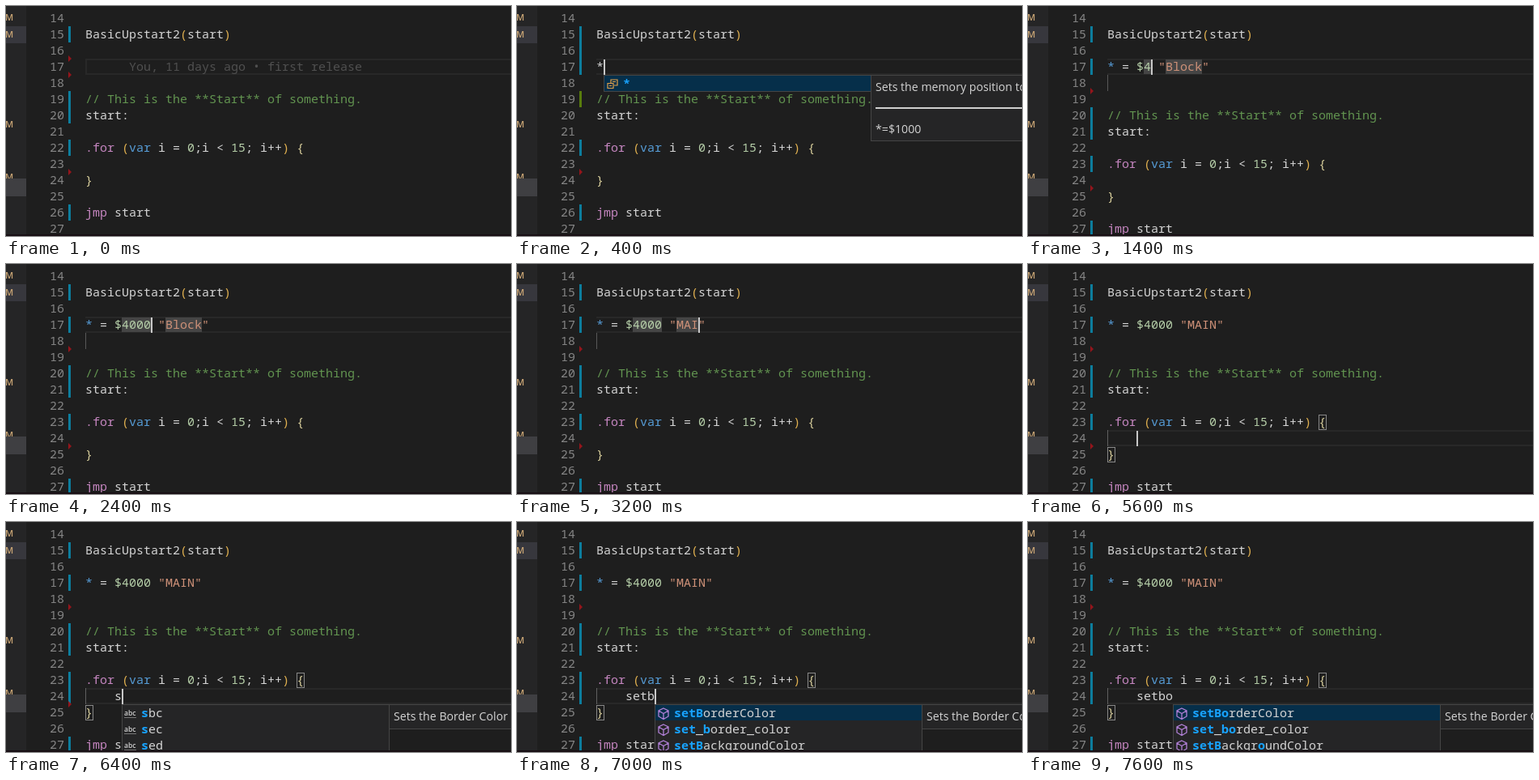
Write an HTML page that moves like this. It is 624 by 284 pixels and loops after 8 s.

```html
<!DOCTYPE html>
<html lang="en">
<head>
<meta charset="utf-8">
<title>Assembler editor</title>
<style>
html, body { margin: 0; width: 100%; height: 100%; overflow: hidden; background: #1e1e1e; }
svg { display: block; width: 624px; height: 284px; }
text { white-space: pre; font: 15px "Noto Sans Mono", monospace; }
.ui { font: 14.15px "Open Sans", sans-serif; }
.m { font: 600 11px "Open Sans", sans-serif; }
.abc { font: 600 8.5px "Open Sans", sans-serif; }
.hit { fill: #18a3ff; font-weight: 700; }
</style>
</head>
<body>
<svg id="stage" viewBox="0 0 624 284"></svg>
<script>
const LOOP = 8000, CH = 9, LH = 20, LEFT = 98, FIRST = 14;
const INK = {
  w: '#d4d4d4', p: '#c586c0', b: '#569cd6', c: '#629450', n: '#b5cea8',
  s: '#ce9178', g: '#e0b050', y: '#d9cf9c', d: '#505050'
};
const BLUE = '#0c7d9d', GREEN = '#587c0c';
const colX = c => LEFT + c * CH;
const topY = n => 5 + (n - FIRST) * LH;
const esc = s => s.replace(/&/g, '&amp;').replace(/</g, '&lt;');
const rect = (x, y, w, h, fill, extra = '') =>
  `<rect x="${x}" y="${y}" width="${w}" height="${h}" fill="${fill}" ${extra}/>`;
const frame = (x, y, w, h, line, fill = 'none') =>
  rect(x + .5, y + .5, w - 1, h - 1, fill, `stroke="${line}"`);
const text = (x, y, body, fill, extra = '') =>
  `<text x="${x}" y="${y}" fill="${fill}" ${extra}>${body}</text>`;

// Each token is an ink letter, "~" and its text; tokens are split by "|".
const paint = src => src.split('|').map(t =>
  `<tspan fill="${INK[t[0]]}">${esc(t.slice(2))}</tspan>`).join('');

function codeLines(s) {
  const org = s.num === null ? s.raw
    : `b~*|w~ = |n~$${s.num}|w~ |s~"${s.name}"`;
  return ['', 'w~BasicUpstart2|g~(|w~start|g~)', '', org, '',
    ...(s.num === null ? [] : ['']),
    'c~// This is the **Start** of something.', 'w~start:', '',
    'p~.for |g~(|b~var|w~ i = |n~0|w~;i < |n~15|w~; i++|g~)|w~ |y~{',
    s.body ? 'w~' + s.body : '', 'y~}', '', 'p~jmp|w~ start', ''].slice(0, 14);
}

function snippetMarks(s) {
  const spots = { num: [5, s.num.length], name: [7 + s.num.length, s.name.length] };
  let out = '';
  for (const key in spots) {
    const [c, len] = spots[key];
    out += rect(colX(c), 66, len * CH, 18, s.sel === key ? '#264f78' : '#454545');
  }
  return out + rect(LEFT, 85, 1, 20, '#585858');
}

function gutter(s) {
  let out = '';
  for (let i = 0; i < 14; i++)
    out += text(72, topY(FIRST + i) + 15, FIRST + i, '#858585', 'text-anchor="end"');
  for (const [a, b, fill = BLUE] of s.bars)
    out += rect(77, topY(a), 3, (b - a + 1) * LH, fill);
  for (const n of s.cuts) {
    const y = topY(n);
    out += `<path d="M77 ${y - 4}l4 4l-4 4z" fill="#94151b"/>`;
  }
  return out;
}

// Letters that match the typed prefix in order are emphasised.
function label(word, typed) {
  let k = 0;
  return [...word].map(ch => k < typed.length && ch.toLowerCase() === typed[k]
    ? (k++, `<tspan class="hit">${ch}</tspan>`) : ch).join('');
}

const icons = {
  abc: (x, y) => text(x + 3, y + 13, 'abc', '#d0d0d0', 'class="abc"') +
    rect(x + 3, y + 15, 15, 1, '#777'),
  cube: (x, y) => `<path d="M${x + 11} ${y + 4}l6 3v7l-6 3.5l-6-3.5v-7zm-6 3l6 3.5l6-3.5m-6 3.5v7"
    fill="none" stroke="#b180d7" stroke-width="1.3"/>`,
  value: (x, y) => `<path d="M${x + 9} ${y + 9}v-4h8v7h-4M${x + 11} ${y + 7.5}h4M${x + 5} ${y + 9.5}h7v6h-7zm2 3h3"
    fill="none" stroke="#e0a04a" stroke-width="1.2"/>`
};

function popup(s) {
  const { rows, icon, typed, pick, note } = s.pop;
  const x = colX(s.cur[1]), y = topY(s.cur[0] + 1);
  let out = frame(x, y, 331, rows.length * LH + (rows.length > 1 ? 8 : 1), '#454545', '#252526');
  rows.forEach((word, i) => {
    const ry = y + 1 + i * LH;
    if (pick && !i) out += rect(x + 1, ry, 329, 19, '#062f4a');
    out += icons[icon](x, ry) + text(x + 24, ry + 15, label(word, typed), '#d4d4d4');
  });
  if (note) {
    const nx = x + 330, [head, code] = note;
    out += frame(nx, y, 300, code ? 82 : 31, '#454545', '#252526') +
      text(nx + 6, y + 20, head, '#d4d4d4', 'class="ui"');
    if (code) out += rect(nx + 6, y + 40, 200, 2, '#cfcfcf') +
      text(nx + 6, y + 72, code, '#d4d4d4', 'class="ui"');
  }
  return out;
}

function sidebar() {
  let out = rect(0, 0, 25, 284, '#252526') + rect(0, 25, 25, 21, '#37373d');
  for (const y of [18, 39, 150, 215]) out += text(-1, y, 'M', '#c5a273', 'class="m"');
  return out + rect(0, 213, 25, 22, '#3f3f42');
}

function draw(s) {
  const [line, col] = s.cur, y = topY(line);
  let out = rect(0, 0, 624, 284, '#1e1e1e') + sidebar();
  out += rect(LEFT, y, 526, 2, '#282828') + rect(LEFT, y + 18, 526, 2, '#282828');
  if (s.blame) out += rect(LEFT, y, 2, 20, '#282828') +
    text(152, y + 15, 'You, 11 days ago • first release', INK.d);
  if (s.marks) out += snippetMarks(s);
  if (s.body) out += rect(LEFT, 205, 1, 20, '#606060') +
    frame(colX(29), 186, 10, 19, '#888') + frame(LEFT, 226, 10, 19, '#888');
  codeLines(s).forEach((src, i) => {
    if (src) out += text(LEFT, topY(FIRST + i) + 15, paint(src), INK.w);
  });
  out += gutter(s);
  if (s.caret) out += rect(colX(col), y + 1, 2, 19, '#c8c8c8');
  if (s.pop) out += popup(s);
  return out + rect(0, 282, 624, 2, '#180f14');
}

const BORDER = ['Sets the Border Color'];
const ops = (typed, rows, note) => ({ icon: 'abc', typed, rows, note });
const sets = typed => ({
  icon: 'cube', typed, pick: true, note: BORDER,
  rows: ['setBorderColor', 'set_border_color', 'setBackgroundColor']
});
const type = (word, pop) => ({ body: '    ' + word, cur: [24, 4 + word.length], pop });
const settled = [[15, 15], [17, 17], [20, 21], [23, 23], [27, 27]];

// Every step changes only the listed fields.
const steps = [
  [0, { raw: '', num: null, name: 'Block', body: '', cur: [17, 0], caret: false, blame: true,
    marks: false, sel: '', pop: null, cuts: [17, 18, 24],
    bars: [[15, 15], [19, 20], [22, 22], [26, 26]] }],
  [200, { raw: 'w~*', cur: [17, 1], caret: true, blame: false }],
  [400, { cuts: [24], bars: [[15, 17], [19, 19, GREEN], [22, 22], [26, 26]],
    pop: { icon: 'value', typed: '*', rows: ['*'], pick: true,
      note: ['Sets the memory position to', '*=$1000'] } }],
  [800, { num: '1000', marks: true, sel: 'num', cur: [17, 9], pop: null }],
  [1000, { bars: settled, cuts: [19, 25] }],
  [1200, { caret: false }],
  [1400, { num: '4', sel: '', cur: [17, 6], caret: true }],
  [1800, { num: '40', cur: [17, 7] }],
  [2000, { num: '400', cur: [17, 8] }],
  [2400, { num: '4000', cur: [17, 9] }],
  [2800, { sel: 'name', cur: [17, 16] }],
  [3000, { name: 'MA', sel: '', cur: [17, 13] }],
  [3200, { name: 'MAI', cur: [17, 14] }],
  [3400, { name: 'MAIN', cur: [17, 15] }],
  [3800, { marks: false, cur: [18, 0] }],
  [4000, { cur: [19, 0] }],
  [4200, { cur: [20, 0] }],
  [4400, { cur: [21, 0] }],
  [4600, { cur: [21, 6] }],
  [4800, { cur: [22, 0] }],
  [5000, { cur: [23, 6] }],
  [5200, { cur: [24, 0] }],
  [5600, type('', null)],
  [5800, { bars: [[15, 15], [17, 17], [20, 21], [23, 24], [27, 27]] }],
  [6000, { caret: false }],
  [6200, { caret: true, ...type('s', ops('s', ['sbc', 'sec', 'sed'])) }],
  [6400, type('s', ops('s', ['sbc', 'sec', 'sed'], BORDER))],
  [6600, { cuts: [19], ...type('se', ops('se', ['sec', 'sed', 'sei'], BORDER)) }],
  [6800, type('set', sets('set'))],
  [7000, type('setb', sets('setb'))],
  [7200, type('setbo', sets('setbo'))],
  [7600, { caret: false }]
];
let state = {};
const scenes = steps.map(([at, change]) => ({ at, view: draw(state = { ...state, ...change }) }));

const stage = document.getElementById('stage');
let shown = null;
function tick() {
  const t = performance.now() % LOOP;
  const scene = scenes.filter(s => s.at <= t).pop();
  if (scene !== shown) stage.innerHTML = (shown = scene).view;
  requestAnimationFrame(tick);
}
tick();
</script>
</body>
</html>
```
